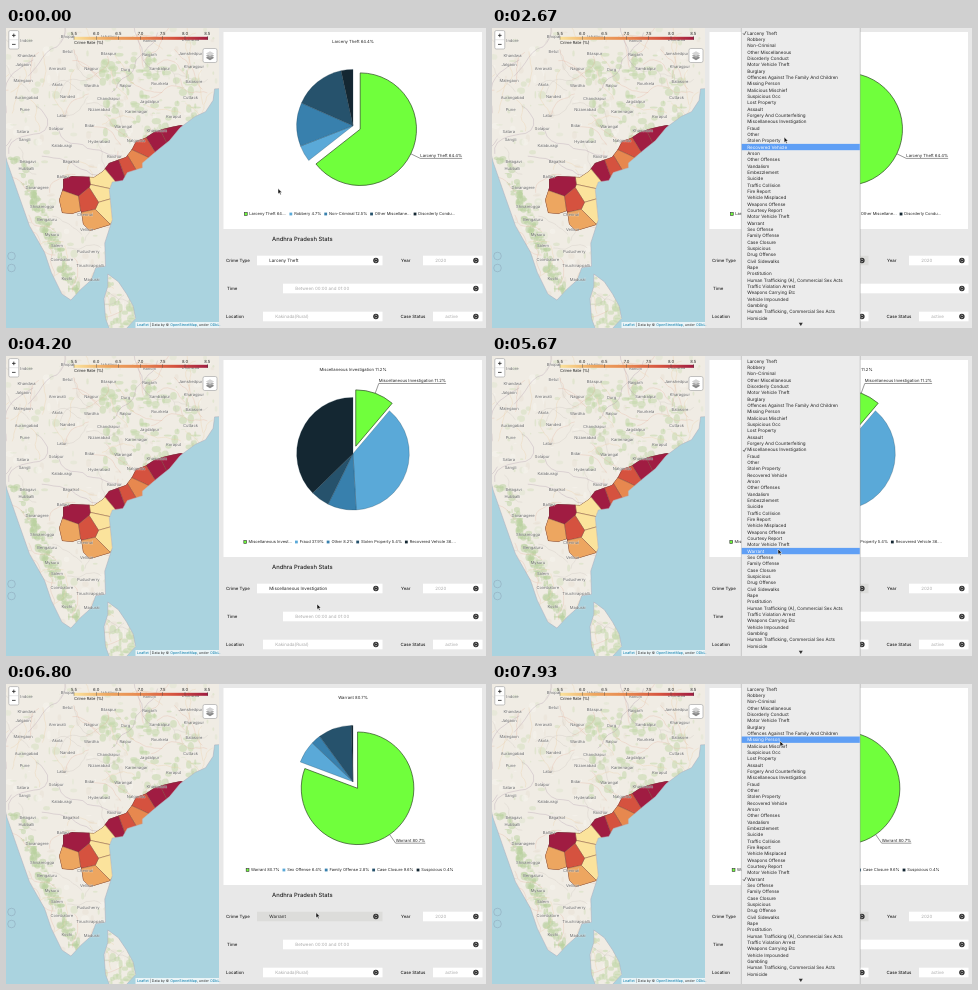
An HTML page for the animation above (8 s loop, 480 by 300 pixels).

```html
<!DOCTYPE html>
<html lang="en">
<head>
<meta charset="utf-8">
<title>Crime map dashboard</title>
<style>
html, body { margin: 0; width: 100%; height: 100%; overflow: hidden; background: #e8e8e8; }
svg { display: block; width: 100%; height: 100%; }
text { font-family: Inter, "Liberation Sans", sans-serif; white-space: pre; text-rendering: geometricPrecision; }
</style>
</head>
<body>
<svg id="stage" viewBox="0 0 480 300" preserveAspectRatio="none"></svg>
<script>
const LOOP = 8000;
const stage = document.getElementById('stage');

// y is the vertical middle of the text
const text = (x, y, s, size = 4.4, fill = '#222', more = '') =>
  `<text x="${x}" y="${y + size * 0.36}" font-size="${size}" fill="${fill}" ${more}>${s}</text>`;
const rect = (x, y, w, h, fill, more = '') =>
  `<rect x="${x}" y="${y}" width="${w}" height="${h}" fill="${fill}" ${more}/>`;
const path = (d, fill, more = '') => `<path d="${d}" fill="${fill}" ${more}/>`;
const line = (d, stroke, width, more = '') =>
  path(d, 'none', `stroke="${stroke}" stroke-width="${width}" ${more}`);
const clipped = (id, d, body) =>
  `<clipPath id="${id}"><path d="${d}"/></clipPath><g clip-path="url(#${id})">${body}</g>`;

const pen = document.createElement('canvas').getContext('2d');
pen.font = '100px Inter, "Liberation Sans", sans-serif';
const widthOf = (s, size) => pen.measureText(s).width * size / 100;

const clamp = v => Math.max(0, Math.min(1, v));
const smooth = v => v * v * (3 - 2 * v);
let seed = 11;
const rnd = (a = 0, b = 1) => a + (b - a) * ((seed = (seed * 16807) % 2147483647) / 2147483647);

// ---------- map ----------
const mercator = lat => Math.log(Math.tan(Math.PI / 4 + lat * Math.PI / 360)) * 180 / Math.PI;
const project = (lon, lat) => [174 - (84.8 - lon) * 15.05, 99 + (mercator(19.15) - mercator(lat)) * 15.2];
const coast = s => 'M' + s.split(', ').map(p => project(...p.split(' ').map(Number)).map(v => v.toFixed(1))).join('L') + 'Z';

const LAND = coast('70 26, 90 26, 89 21.6, 87.1 21.5, 87 20.8, 86.5 20.1, 85.8 19.8, 84.8 19.1, 84.1 18.3, 83.3 17.7, ' +
  '82.3 16.9, 82.3 16.6, 81.3 16.3, 81 15.8, 80.3 15.7, 80.1 15.2, 80.3 13.3, 79.8 11.8, 79.85 10.3, 79.2 10.2, ' +
  '78.9 9.4, 78.2 8.8, 77.55 8.1, 76.95 8.5, 76.25 9.9, 75.8 11.2, 74.8 12.9, 74.1 14.8, 73.3 17, 72.8 19') +
  coast('80 9.8, 80.7 9.3, 81.25 8.5, 81.7 7.7, 81.85 6.9, 81.1 6.1, 80.2 6, 79.85 6.9, 79.75 8.2, 80 9');
const STATE = 'M175 97L165 99L157 101L148 104L139 110L130 113L126 121L120 129L103 135L97 143L88 149L66 148L57 151' +
  'V160L53 172L56 185L66 186L75 183L77 196L84 203L104 197L126 165L182 100Z';

// district centre and crime level
const HEAT = ['#fbe39c', '#eda660', '#e7884f', '#d5523f', '#a01c42'];
const DISTRICTS = [
  [164, 104, 4], [150, 111, 4], [137, 119, 3], [131, 132, 2], [121, 138, 3], [110, 142, 4], [98, 152, 0],
  [95, 166, 0], [99, 180, 0], [70, 156, 4], [63, 176, 1], [84, 173, 3], [88, 191, 1]
];

// part of a polygon that lies nearer to p than to q
function nearer(poly, p, q) {
  const side = v => (v[0] - (p[0] + q[0]) / 2) * (q[0] - p[0]) + (v[1] - (p[1] + q[1]) / 2) * (q[1] - p[1]);
  return poly.flatMap((a, i) => {
    const b = poly[(i + 1) % poly.length], sa = side(a), sb = side(b), k = sa / (sa - sb);
    const keep = sa <= 0 ? [a] : [];
    return sa * sb < 0 ? [...keep, [a[0] + (b[0] - a[0]) * k, a[1] + (b[1] - a[1]) * k]] : keep;
  });
}

function districts() {
  const box = [[0, 0], [213, 0], [213, 300], [0, 300]];
  const cells = DISTRICTS.map(p => {
    const cell = DISTRICTS.reduce((poly, q) => q === p ? poly : nearer(poly, p, q), box);
    return path('M' + cell.join('L') + 'Z', HEAT[p[2]], 'stroke="#7a4436" stroke-width=".4"');
  });
  return clipped('state', STATE, cells.join('') + line(STATE, '#6b3a38', 0.8));
}

// town names, north to south, each row from west to east
const TOWNS = `Indore Bhopal Jabalpur Ranchi Dhanbad
Khandwa Betul Bilaspur Raigarh Jamshedpur
Jalgaon Amravati Nagpur Durg Sambalpur Kharagpur
Malegaon Akola Wardha Raipur Rourkela Balasore
Aurangabad Nanded Chandrapur Jagdalpur Cuttack
Pune Latur Nizamabad Karimnagar Koraput
Satara Solapur Bidar Warangal Khammam
Sangli Kalaburagi Hyderabad Nalgonda
Belagavi Bagalkot Raichur
Hubballi Ballari
Davanagere
Shivamogga
Bengaluru Chennai
Mysuru Vellore
Salem Puducherry
Coimbatore Tiruchirappalli
Kochi Madurai`.split('\n').map(row => row.split(' '));

function towns() {
  return TOWNS.map((row, i) => {
    const y = 10 + i * 15;
    const west = Math.max(0, (y - 140) * 0.44), east = y < 75 ? 205 : Math.max(98, 205 - (y - 70) * 1.25);
    return row.map((name, k) => {
      const x = west + (east - west) * (k + 0.5) / (row.length + (i > 8 && i < 12 ? 1 : 0));
      return text(x, y + rnd(-4, 4), name, 4.1, '#666',
        'text-anchor="middle" stroke="#fff" stroke-opacity=".5" stroke-width=".6" paint-order="stroke"');
    }).join('');
  }).join('');
}

function wander(x, y, step, n) {
  let d = `M${x} ${y}`, a = rnd(0, 6.28);
  for (let i = 0; i < n; i++) {
    a += rnd(-0.55, 0.55);
    x += Math.cos(a) * step;
    y += Math.sin(a) * step;
    d += `L${x.toFixed(1)} ${y.toFixed(1)}`;
  }
  return d;
}

function terrain() {
  const blob = (x, y, r, fill) =>
    `<ellipse cx="${x}" cy="${y}" rx="${rnd(0.5, r)}" ry="${rnd(0.5, r)}" fill="${fill}" opacity=".5"/>`;
  let s = rect(0, 0, 213, 300, '#f0ece4');
  for (let i = 0; i < 420; i++)
    s += blob(rnd(0, 213), rnd(0, 300), 4, ['#d3dfbd', '#f8f5f0', '#e9e2d6', '#dfe6cf'][i % 4]);
  for (let i = 0; i < 130; i++) {   // eastern forests, western hills, the island
    const y = rnd(130, 265);
    s += blob(rnd(95, 190), rnd(25, 115), 5, '#c2d8a8') + blob((y - 130) * 0.45 + rnd(4, 16), y, 4, '#b9d29f');
    if (i % 3 === 0) s += blob(rnd(98, 130), rnd(245, 300), 5, '#c2d8a8');
  }
  for (let i = 0; i < 110; i++)
    s += line(wander(rnd(0, 213), rnd(0, 290), 4, 9), ['#e2b3a0', '#e8cda4', '#c9c2bc'][i % 3], 0.4, 'opacity=".8"');
  for (let i = 0; i < 10; i++)
    s += line(wander(rnd(0, 190), rnd(0, 230), 6, 13), '#b39db0', 0.5, 'opacity=".7"');
  return s;
}

function mapView() {
  let s = rect(0, 0, 213, 300, '#aad3df');
  s += `<svg width="213" height="300">${clipped('land', LAND, terrain() + districts())}${line(LAND, '#a9a9b8', 0.5)}${towns()}</svg>`;
  for (const y of [228, 240])
    s += `<circle cx="5.5" cy="${y}" r="3.8" fill="none" stroke="#8fa9bd" stroke-width=".6"/>`;

  s += '<linearGradient id="scale">' + HEAT.map((c, i) => `<stop offset="${i / 4}" stop-color="${c}"/>`).join('') + '</linearGradient>';
  s += rect(68, 8.8, 134, 3, 'url(#scale)');
  for (let i = 0; i < 7; i++) {
    const x = 68 + i * 22.2;
    s += text(x, 5.7, (5.5 + i * 0.5).toFixed(1), 4.2, '#222', 'text-anchor="middle"') + rect(x - 0.2, 8, 0.4, 3.8, '#444');
  }
  s += text(68, 14.3, 'Crime Rate (%)', 4.1);

  s += rect(2.8, 2.6, 10, 18.4, '#fff', 'rx="1.4" stroke="#aaa" stroke-width=".7"') + rect(2.8, 11.6, 10, 0.5, '#ccc');
  s += line('M6 7.4H9.6M7.8 5.6V9.2M6 16.4H9.6', '#222', 0.8);
  s += rect(197, 20.5, 14, 14, '#fff', 'rx="1.8" stroke="#aaa" stroke-width=".7"');
  ['#888', '#aaa', '#d4d4d4'].forEach((c, i) => {
    s += path(`M199.8 ${29.8 - i * 2.1}l4.2 2.4l4.2 -2.4l-4.2 -2.4Z`, c);
  });
  const link = name => `<tspan fill="#0078a8">${name}</tspan>`;
  s += rect(129.5, 294, 83.5, 6, '#fff', 'opacity=".75"');
  return s + text(131, 297.1, `${link('Leaflet')} | Data by © ${link('OpenStreetMap')}, under ${link('ODbL.')}`, 3.6, '#333');
}

// ---------- form ----------
const knob = (x, y) =>
  `<circle cx="${x}" cy="${y}" r="2.7" fill="#2b2b2b"/>` +
  line(`M${x - 1.3} ${y - 0.5}l1.3 -1.1l1.3 1.1M${x - 1.3} ${y + 0.5}l1.3 1.1l1.3 -1.1`, '#fff', 0.55);

const field = (label, lx, x, right, y, value, ink = '#aaa', fill = '#fff') =>
  text(lx, y, label, 4.35, '#222', 'font-weight="500"') + rect(x, y - 4.8, right - x, 9.6, fill) +
  text(x + 12.3, y, value, 4.45, ink) + knob(right - 6.6, y);

const form = () =>
  rect(217.5, 4, 258.5, 197, '#fff') +
  text(266, 210.8, 'Andhra Pradesh Stats', 5.85, '#222', 'font-weight="500"') +
  field('Year', 395, 417, 476.5, 232.5, '2020') +
  field('Time', 221, 277, 476.5, 260.5, 'Between 00:00 and 01:00') +
  field('Location', 220, 257, 376.5, 288.5, 'Kakinada(Rural)') +
  field('Case Status', 394.5, 427, 476.5, 288.5, 'active');

// ---------- chart ----------
const COLORS = ['#70ff3c', '#5aa9d8', '#3880ad', '#26526c', '#142732'];
const CHARTS = [
  { start: -2000, name: 'Larceny Theft', shares: [64.4, 4.7, 12.5, 15, 3.4],
    legend: ['Larceny Theft 64....', 'Robbery 4.7%', 'Non-Criminal 12.5%', 'Other Miscellane...', 'Disorderly Condu...'] },
  { start: 3450, name: 'Miscellaneous Investigation', shares: [11.2, 37.9, 8.2, 5.4, 37.3],
    legend: ['Miscellaneous Invest...', 'Fraud 37.9%', 'Other 8.2%', 'Stolen Property 5.4%', 'Recovered Vehicle 36....'] },
  { start: 6000, name: 'Warrant', shares: [80.7, 6.4, 2.8, 9.6, 0.5],
    legend: ['Warrant 80.7%', 'Sex Offense 6.4%', 'Family Offense 2.8%', 'Case Closure 9.6%', 'Suspicious 0.4%'] }
];
const HUB = [347, 97.7], RADIUS = 56.3;
const polar = ([x, y], r, a) => [x + r * Math.sin(a), y - r * Math.cos(a)];

function legendView(names) {
  const size = 4.05, gap = 7.7;
  const widths = names.map(n => widthOf(n, size));
  let x = 346.2 - (widths.reduce((a, b) => a + b) + gap * (names.length - 1)) / 2;
  return names.map((n, i) => {
    const item = rect(x - 4.7, 184.6, 2.8, 2.8, COLORS[i], i ? '' : 'stroke="#333" stroke-width=".6"') + text(x, 186, n, size);
    x += widths[i] + gap;
    return item;
  }).join('');
}

function chartView({ start, name, shares, legend }, t) {
  const grow = smooth(clamp((t - start) / 560));
  const fade = clamp((t - start - 560) / 150);
  const title = `${name} ${shares[0]}%`;
  let s = text(347, 13.7, title, 4.2, '#222', 'text-anchor="middle"') + legendView(legend), from = 0;
  shares.forEach((share, i) => {
    const to = from + share / 100 * Math.PI * 2 * grow;
    const hub = i ? HUB : polar(HUB, 8, to / 2);
    s += path(`M${hub}L${polar(hub, RADIUS, from)}A${RADIUS} ${RADIUS} 0 ${to - from > Math.PI ? 1 : 0} 1 ${polar(hub, RADIUS, to)}Z`,
      COLORS[i], `stroke="${i ? '#1d3a4b' : '#2c4a22'}" stroke-width="${i ? 0.25 : 0.7}"`);
    from = to;
  });
  const mid = shares[0] / 100 * Math.PI, tip = polar(HUB, RADIUS + 8, mid), [x, y] = polar(HUB, RADIUS + 18.5, mid);
  return s + `<g opacity="${fade}">${text(x, y - 3, title, 4.2)}${line(`M${tip}L${x} ${y}h${widthOf(title, 4.2)}`, '#333', 0.5)}</g>`;
}

// ---------- menu ----------
const ITEMS = ('Larceny Theft|Robbery|Non-Criminal|Other Miscellaneous|Disorderly Conduct|Motor Vehicle Theft|Burglary|' +
  'Offences Against The Family And Children|Missing Person|Malicious Mischief|Suspicious Occ|Lost Property|Assault|' +
  'Forgery And Counterfeiting|Miscellaneous Investigation|Fraud|Other|Stolen Property|Recovered Vehicle|Arson|' +
  'Other Offenses|Vandalism|Embezzlement|Suicide|Traffic Collision|Fire Report|Vehicle Misplaced|Weapons Offense|' +
  'Courtesy Report|Motor Vehicle Theft|Warrant|Sex Offense|Family Offense|Case Closure|Suspicious|Drug Offense|' +
  'Civil Sidewalks|Rape|Prostitution|Human Trafficking (A), Commercial Sex Acts|Traffic Violation Arrest|' +
  'Weapons Carrying Etc|Vehicle Impounded|Gambling|Human Trafficking, Commercial Sex Acts|Homicide').split('|');
const ROW = 6.335, TOP = 5;
const MENUS = [[1930, 3300], [5000, 5870], [7400, LOOP]];   // open, close

function menuView(current, y) {
  const hover = Math.round((y - TOP) / ROW), checked = ITEMS.indexOf(current);
  let s = rect(248.8, -2, 120, 304, '#000', 'opacity=".12"') +
    rect(249.5, -2, 118.5, 304, '#ececec', 'stroke="#bdbdbd" stroke-width=".5"');
  ITEMS.forEach((name, i) => {
    const mid = TOP + i * ROW, ink = i === hover ? '#fff' : '#222';
    if (i === hover) s += rect(249.7, mid - ROW / 2, 118.1, ROW, '#5f9ff5');
    if (i === checked) s += line(`M251 ${mid + 0.3}l1.2 1.5l2 -3.7`, ink, 0.6);
    s += text(255.2, mid, name, 4.55, ink);
  });
  return s + path('M306.8 294.7h4l-2 3.3Z', '#333');
}

// ---------- pointer ----------
const MOVES = [   // start, end, x, y
  [0, 0, 272, 160.5], [70, 1500, 310, 235], [1930, 2760, 290, 94], [3300, 4150, 311, 248], [4300, 4900, 310, 234],
  [5000, 5400, 286, 193], [5870, 6500, 310, 228.5], [7400, 7600, 301, 152], [7800, 7840, 288, 57]
];
const pointer = t => MOVES.reduce(([px, py], [from, to, x, y]) => {
  const k = clamp((t - from) / (to - from || 1));
  return [px + (x - px) * k, py + (y - py) * k];
}, MOVES[0].slice(2));

// ---------- scene ----------
stage.innerHTML = mapView() + form() + '<g id="type"></g><g id="chart"></g><g id="menu"></g>' +
  path('M0 0V5.4L1.3 4.3L2.2 6.3L3.2 5.9L2.3 3.9H4Z', '#111', 'id="arrow" stroke="#fff" stroke-width=".5"');
const [type, chart, menu, arrow] = ['type', 'chart', 'menu', 'arrow'].map(id => document.getElementById(id));

const shown = new Map();
function put(node, html) {
  if (shown.get(node) === html) return;
  shown.set(node, html);
  node.innerHTML = html;
}

function render(t) {
  const [x, y] = pointer(t);
  const open = MENUS.some(([from, to]) => t >= from && t < to);
  const value = CHARTS[MENUS.filter(m => t >= m[1]).length].name;
  const over = x > 251 && x < 376 && y > 227.7 && y < 237.3;
  put(type, field('Crime Type', 220, 251, 376.5, 232.5, value, '#222', open || over ? '#dcdcda' : '#fff'));
  put(chart, chartView(CHARTS.filter(c => t >= c.start).pop(), t));
  put(menu, open ? menuView(value, pointer(t - 70)[1]) : '');   // the highlight trails the pointer
  arrow.setAttribute('transform', `translate(${x.toFixed(2)} ${y.toFixed(2)})`);
}

const begin = performance.now();
function tick() {
  render((performance.now() - begin) % LOOP);
  requestAnimationFrame(tick);
}
tick();
</script>
</body>
</html>
```
